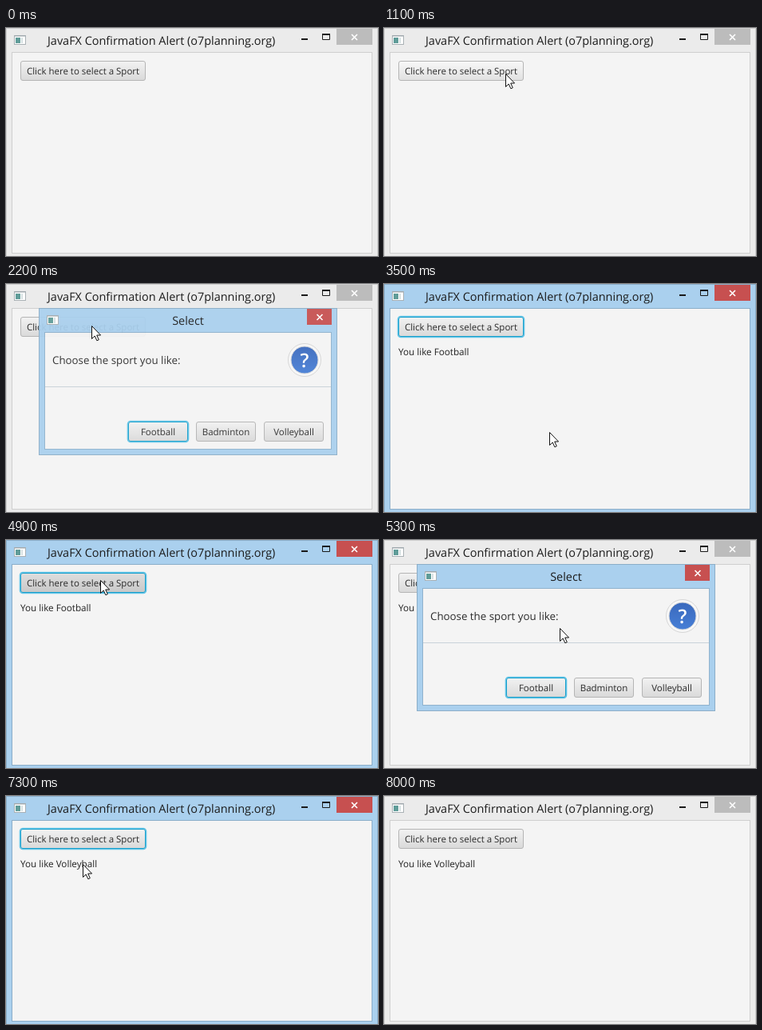
Animation of 466x285 px, one loop 8100 ms. Source, as an HTML page:

```html
<!DOCTYPE html>
<html lang="en">
<head>
<meta charset="utf-8">
<title>JavaFX Confirmation Alert</title>
<style>
  html, body { margin: 0; width: 100%; height: 100%; overflow: hidden; background: #ebebeb; }
  svg { display: block; width: 466px; height: 285px; }
  text { font-family: "Open Sans", "Noto Sans", sans-serif; font-size: 11.5px; fill: #2b2b2b; text-rendering: geometricPrecision; }
  .title { font-size: 14.45px; fill: #1c1c1c; }
  .header { font-size: 13.3px; }
  .answer { font-size: 11.7px; fill: #222; }
  .mark { font-size: 24px; font-weight: 600; fill: #fff; }
  .mid { text-anchor: middle; }
</style>
</head>
<body>
<svg viewBox="0 0 466 285" xmlns="http://www.w3.org/2000/svg">
  <defs>
    <linearGradient id="normal" x2="0" y2="1"><stop stop-color="#f2f2f2"/><stop offset="1" stop-color="#d9d9d9"/></linearGradient>
    <linearGradient id="hover" x2="0" y2="1"><stop stop-color="#f8f8f8"/><stop offset="1" stop-color="#e0e0e0"/></linearGradient>
    <linearGradient id="pressed" x2="0" y2="1"><stop stop-color="#dedede"/><stop offset="1" stop-color="#c8c8c8"/></linearGradient>
    <linearGradient id="ball" x2="0" y2="1"><stop stop-color="#3a69bd"/><stop offset="1" stop-color="#477fd6"/></linearGradient>
    <g id="appIcon">
      <rect x=".5" y=".5" width="14" height="11" fill="#fff" stroke="#a9b1b5"/>
      <path d="M1 1H14" stroke="#9aa3a8"/>
      <rect x="2" y="3" width="6" height="7" fill="#5f9c98"/>
      <rect x="9" y="3" width="2" height="7" fill="#d5e0e2"/>
    </g>
    <path id="cross" d="M-3.5 -3.5L3.5 3.5M3.5 -3.5L-3.5 3.5" stroke="#fff" stroke-width="1.6"/>
  </defs>

  <rect id="frame" x=".5" y=".5" width="465" height="290"/>
  <rect id="client" x="7.5" y="30.5" width="451" height="251" fill="#f4f4f4"/>
  <use href="#appIcon" x="10" y="9"/>
  <text class="title" x="52" y="21">JavaFX Confirmation Alert (o7planning.org)</text>
  <path d="M370 14H378" stroke="#1a1a1a" stroke-width="2"/>
  <path d="M396.5 8V14.5H405.5V8" fill="none" stroke="#1a1a1a"/>
  <path d="M396 8H406" stroke="#1a1a1a" stroke-width="2"/>
  <rect id="close" x="414" y="1" width="45" height="20"/>
  <use href="#cross" x="436.5" y="11.5"/>
  <g id="mainButtons"></g>
  <text id="answer" class="answer" x="18" y="89"></text>

  <g id="dialog">
    <rect x="41.5" y="30.5" width="373" height="183" fill="#aad0ee" stroke="#8caec8"/>
    <rect x="48.5" y="60.5" width="359" height="146" fill="#f4f4f4" stroke="#8fb2cd"/>
    <path d="M49 128.5H407" stroke="#c9d2d9"/>
    <use href="#appIcon" x="51" y="39"/>
    <text class="title mid" x="228" y="51">Select</text>
    <rect x="377" y="31" width="31" height="20" fill="#c75050"/>
    <use href="#cross" x="393" y="41.5"/>
    <text class="header" x="58" y="100">Choose the sport you like:</text>
    <circle cx="374" cy="95" r="20.5" fill="#f8f8f8" stroke="#d6d6d6"/>
    <circle cx="374" cy="95" r="17" fill="url(#ball)" stroke="#dadada"/>
    <text class="mark mid" x="374" y="103.5">?</text>
    <g id="dialogButtons"></g>
  </g>

  <path id="cursor" d="M.5 .5V16.5L4.2 13L6.9 18.8L9.3 17.7L6.7 12H11.6Z" fill="#fff" stroke="#111"/>
</svg>
<script>
const LOOP = 8100, STEP = 100;
const SVG = "http://www.w3.org/2000/svg";
const $ = id => document.getElementById(id);
const set = (node, attrs) => { for (const key in attrs) node.setAttribute(key, attrs[key]); };

function add(parent, tag, attrs) {
  const node = document.createElementNS(SVG, tag);
  set(node, attrs);
  return parent.appendChild(node);
}

function makeButton(parent, label, x, y, w, h) {
  const glow = add(parent, "rect", { x: x - .5, y: y - .5, width: w + 1, height: h + 1, rx: 3.5,
    fill: "none", stroke: "#62c5e8", "stroke-width": 1.6 });
  const body = add(parent, "rect", { x: x + .5, y: y + .5, width: w - 1, height: h - 1, rx: 2.5 });
  add(parent, "text", { class: "mid", x: x + w / 2, y: y + h / 2 + 4.2 }).textContent = label;
  const contains = p => p.x >= x && p.x < x + w && p.y >= y && p.y < y + h;
  return (focused, pressed, point) => {
    const state = pressed ? "pressed" : contains(point) ? "hover" : "normal";
    set(glow, { visibility: focused ? "inherit" : "hidden" });
    set(body, { fill: `url(#${state})`, stroke: focused ? "#189fcb" : "#b5b5b5" });
  };
}

const opener = makeButton($("mainButtons"), "Click here to select a Sport", 18, 41, 157, 25);
const sports = ["Football", "Badminton", "Volleyball"];
const sportButtons = sports.map((name, i) => makeButton($("dialogButtons"), name, 153 + 85 * i, 172, 75, 25));

const clamp = k => Math.min(1, Math.max(0, k));
const ramp = (t, start, length) => clamp((t - start) / length);
const easeOut = k => 1 - (1 - k) ** 2;
const mix = (from, to, k) => `rgb(${from.map((v, i) => Math.round(v + (to[i] - v) * k))})`;

// The pointer enters, makes each leg in turn, and leaves at the right
const entry = { x: 444, y: 36, time: 400 }, exitTime = 7800;
const legs = [
  { start: 400, end: 1500, x: 107, y: 52, sag: 18 },
  { start: 2500, end: 3200, x: 207, y: 185 },
  { start: 3800, end: 4800, x: 118, y: 50 },
  { start: 5100, end: 5900, x: 350, y: 188 },
  { start: 6400, end: 7300, x: 96, y: 85 },
  { start: 7300, end: exitTime, x: 480, y: 39 }
];

// Each visit presses the opener, shows the dialog and picks a sport
const visits = [
  { press: 1600, open: 1900, close: 3300, fade: 200, pick: "Football" },
  { press: 4800, open: 4900, close: 6100, fade: 100, pick: "Volleyball" }
];

function pointerAt(t) {
  let { x, y } = entry;
  for (const leg of legs) {
    const k = easeOut(ramp(t, leg.start, leg.end - leg.start));
    x += (leg.x - x) * k;
    y += (leg.y - y) * k + (leg.sag || 0) * Math.sin(Math.PI * k);
  }
  return { x: Math.round(x), y: Math.round(y) };
}

function draw(t) {
  const point = pointerAt(t);
  const pointerShown = t >= entry.time && t < exitTime;
  let active = ramp(t, 1500, 300) - ramp(t, 7900, 100);
  let shown = 0, pressing = false, picked = null, answer = "";
  for (const { press, open, close, fade, pick } of visits) {
    const closing = ramp(t, close, fade);
    active += closing - ramp(t, open, 300);
    shown += easeOut(ramp(t, open, 400)) - closing;
    pressing ||= t >= press && t <= open;
    if (t >= close - 100 && closing < 1) picked = pick;
    if (t > close) answer = `You like ${pick}`;
  }

  const edge = mix([207, 207, 207], [139, 174, 201], active);
  set($("frame"), { fill: mix([235, 235, 235], [170, 208, 238], active), stroke: edge });
  set($("client"), { stroke: edge });
  set($("close"), { fill: mix([188, 188, 188], [199, 80, 80], active) });
  $("answer").textContent = answer;
  opener(active > .2 && shown === 0, pressing, shown === 0 && pointerShown ? point : entry);

  set($("dialog"), { opacity: shown, visibility: shown > 0 ? "visible" : "hidden" });
  const focused = picked || sports[0];
  sportButtons.forEach((update, i) => update(sports[i] === focused, sports[i] === picked, point));

  set($("cursor"), { transform: `translate(${point.x} ${point.y})`, visibility: pointerShown ? "visible" : "hidden" });
}

const start = performance.now();
function tick() {
  const elapsed = (performance.now() - start) % LOOP;
  draw(Math.floor(elapsed / STEP) * STEP);
  requestAnimationFrame(tick);
}
tick();
</script>
</body>
</html>
```
